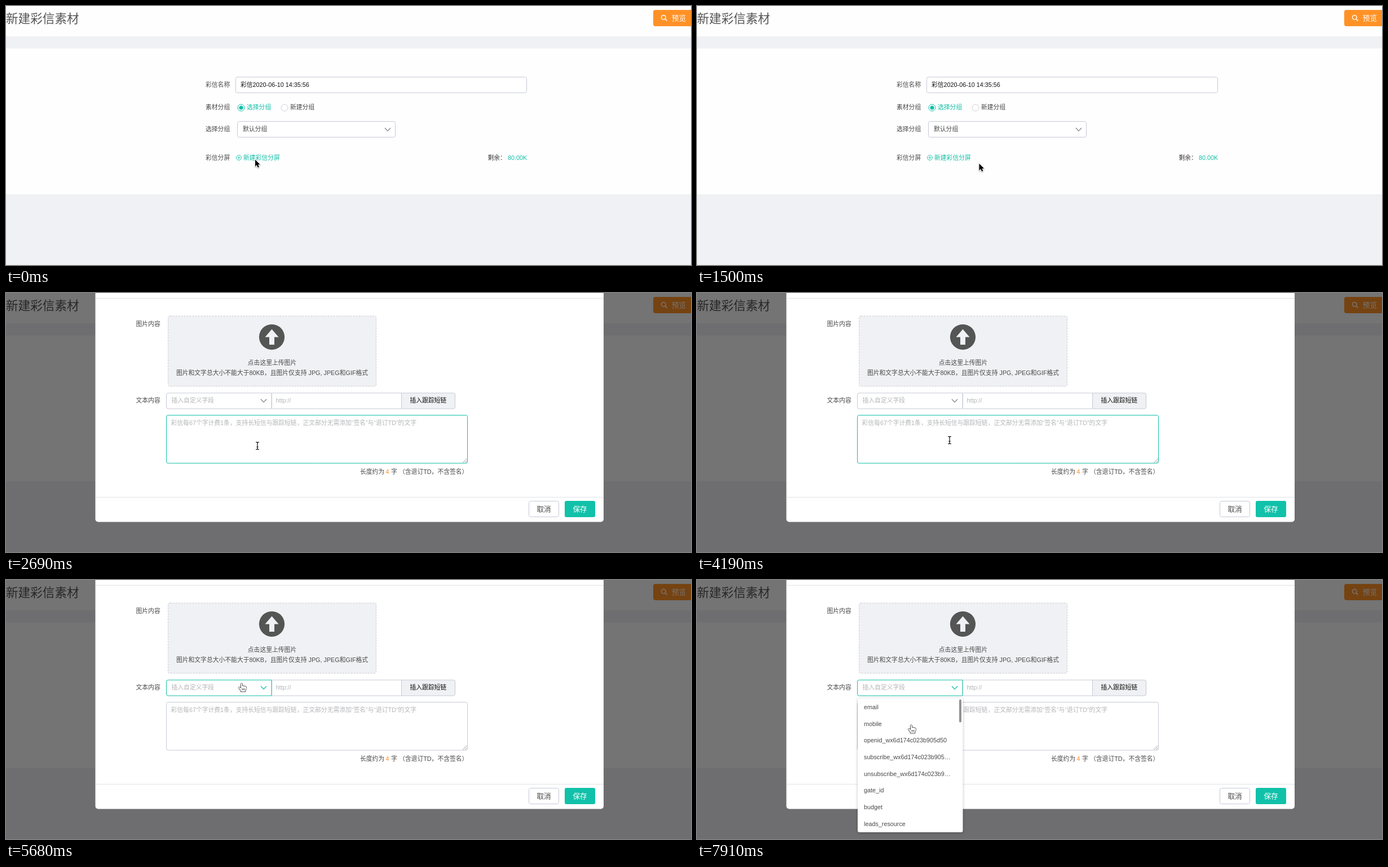
Recreate the animation shown at these times as an HTML page with a canvas. Size 1215 by 461 pixels, loop 8000 ms.

```html
<!DOCTYPE html>
<html lang="zh-CN">
<head>
<meta charset="utf-8">
<style>
html, body { margin: 0; width: 100%; height: 100%; overflow: hidden; background: #fff; }
canvas { display: block; width: 1215px; height: 461px; }
</style>
</head>
<body>
<canvas id="stage" width="1215" height="461"></canvas>
<script>
const ctx = document.getElementById('stage').getContext('2d');
const W = 1215, H = 461, LOOP = 8000;
const FONT = '"Liberation Sans", "Noto Sans CJK SC", "Noto Sans CJK", sans-serif';
const TEAL = '#10bfa6', GREY = '#f0f1f4', BORDER = '#c6cad6', INK = '#484848', HINT = '#b4b5b8';

// Pointer stops: start time, left, top, shape
const STOPS = [
  [0, 440.5, 272.5, 'arrow'], [150, 472, 275, 'arrow'], [300, 590, 278, 'arrow'],
  [450, 745, 280, 'arrow'], [600, 885, 280, 'arrow'], [750, 960, 279, 'arrow'],
  [900, 978, 278, 'arrow'], [1050, 913, 278, 'arrow'], [1200, 770, 279, 'arrow'],
  [1350, 610, 279, 'arrow'], [1500, 499, 279.5, 'arrow'], [1650, 445, 275, 'arrow'],
  [1950, 445, 270.5, 'arrow'], [2400, 440, 270, 'hand'], [2550, 446, 272, 'beam'],
  [4190, 448, 262, 'beam'], [4340, 456, 205, 'arrow'], [4490, 457, 163, 'hand'],
  [4640, 456, 151, 'hand'], [5090, 455, 152, 'hand'], [5240, 449, 157, 'hand'],
  [5390, 438, 169, 'arrow'], [5540, 412, 183, 'hand'], [5690, 398, 193, 'hand'],
  [5830, 392, 197, 'hand'], [7330, 392, 200, 'hand'], [7480, 390, 212, 'hand'],
  [7630, 385, 233, 'hand'], [7780, 378, 250, 'hand'], [7910, 374, 257, 'hand']
];
const FIELDS = ['email', 'mobile', 'openid_wx6d174c023b905d50', 'subscribe_wx6d174c023b905…',
  'unsubscribe_wx6d174c023b9…', 'gate_id', 'budget', 'leads_resource'];

function rect(x, y, w, h, color) {
  ctx.fillStyle = color;
  ctx.fillRect(x, y, w, h);
}

function box(x, y, w, h, r, fill, stroke, dash = []) {
  ctx.beginPath();
  ctx.roundRect(x, y, w, h, r);
  if (fill) { ctx.fillStyle = fill; ctx.fill(); }
  if (stroke) {
    ctx.lineWidth = 1;
    ctx.strokeStyle = stroke;
    ctx.setLineDash(dash);
    ctx.stroke();
    ctx.setLineDash([]);
  }
}

// y is the middle of the line
function text(s, x, y, color = INK, size = 10.8, align = 'left') {
  ctx.font = `${size}px ${FONT}`;
  ctx.textAlign = align;
  ctx.fillStyle = color;
  ctx.fillText(s, x, y + size * 0.37);
}

function line(color, width, ...p) {
  ctx.beginPath();
  ctx.moveTo(p[0], p[1]);
  for (let i = 2; i < p.length; i += 2) ctx.lineTo(p[i], p[i + 1]);
  ctx.strokeStyle = color;
  ctx.lineWidth = width;
  ctx.stroke();
}

function circle(x, y, r, fill, stroke, width = 1) {
  ctx.beginPath();
  ctx.arc(x, y, r, 0, Math.PI * 2);
  if (fill) { ctx.fillStyle = fill; ctx.fill(); }
  if (stroke) { ctx.strokeStyle = stroke; ctx.lineWidth = width; ctx.stroke(); }
}

function chevron(x, y, color) {
  line(color, 1.2, x - 5, y - 2.5, x, y + 2.8, x + 5, y - 2.5);
}

function drawPage(hover) {
  rect(0, 0, W, H, '#fefefe');
  rect(0, 54, W, 21.5, GREY);
  rect(0, 335, W, H - 335, GREY);
  text('新建彩信素材', 0, 22, '#555', 21.6);

  box(1148, 7, 75, 29, 4, '#ff9226');
  circle(1166.3, 20.3, 3.8, null, '#fff', 1.4);
  line('#fff', 1.6, 1169, 23, 1172.5, 26.5);
  text('预览', 1180.8, 21.5, '#fff', 12.6);

  text('彩信名称', 354, 140.5);
  box(407.5, 126.5, 516, 28, 3, '#fff', BORDER);
  text('彩信2020-06-10 14:35:56', 416, 140.5, '#111');

  text('素材分组', 354, 180.5);
  circle(417, 181, 6, '#fff', TEAL);
  circle(417, 181, 3.6, TEAL);
  text('选择分组', 427, 180.5, TEAL);
  circle(494, 181, 6, '#fff', '#cdd0d8');
  text('新建分组', 504, 180.5);

  text('选择分组', 354, 219.5);
  box(410.5, 205.5, 280, 28, 3, '#fff', BORDER);
  text('默认分组', 420, 219.5);
  chevron(677, 219.5, '#7d828c');

  const link = hover ? '#0d9f8a' : TEAL;
  text('彩信分屏', 354, 270);
  circle(413, 270, 4.4, null, link, 0.9);
  line(link, 0.9, 410.5, 270, 415.5, 270);
  line(link, 0.9, 413, 267.5, 413, 272.5);
  text('新建彩信分屏', 421, 270, link);
  if (hover) line(link, 1, 408, 275.5, 486, 275.5);
  text('剩余：', 854.5, 270, '#333');
  text('80.00K', 890, 270, TEAL);
}

function drawUpload(glow) {
  const mix = (a, b) => Math.round(a + (b - a) * glow);
  const fill = `rgb(${mix(240, 229)},${mix(241, 254)},${mix(244, 248)})`;
  box(287.5, 41, 369, 125, 3, fill, glow ? TEAL : '#c9cacf', glow ? [] : [3, 2]);
  circle(471.5, 78.3, 22.6, '#555');
  ctx.beginPath();
  ctx.moveTo(471.5, 64.5);
  ctx.lineTo(483.5, 78.5);
  ctx.lineTo(476, 78.5);
  ctx.lineTo(476, 92);
  ctx.lineTo(467, 92);
  ctx.lineTo(467, 78.5);
  ctx.lineTo(459.5, 78.5);
  ctx.fillStyle = fill;
  ctx.fill();
  text('点击这里上传图片', 472, 124.5, INK, 10.8, 'center');
  text('图片和文字总大小不能大于80KB，且图片仅支持 JPG, JPEG和GIF格式', 472, 142.5, INK, 10.8, 'center');
}

function drawModal(t) {
  rect(0, 0, W, H, 'rgba(0,0,0,.54)');
  box(158.5, -10, 901.5, 417.5, 5, '#fff');
  rect(158.5, 9, 901.5, 1, '#e1e2e6');
  rect(158.5, 363, 901.5, 1, '#e1e2e6');

  text('图片内容', 230.5, 55);
  const glow = t < 4490 ? 0 : t < 4640 ? 0.6 : t < 5390 ? 1 : 0;
  drawUpload(glow);

  text('文本内容', 230.5, 191.5);
  const active = t >= 5540;
  box(471.5, 178, 230, 28, 0, '#fff', BORDER);
  text('http://', 478.5, 191.5, HINT);
  box(701.5, 178, 95, 28, [0, 3, 3, 0], GREY, BORDER);
  text('插入跟踪短链', 716.5, 191.5, '#111');
  box(284.5, 178, 186.5, 28, [3, 0, 0, 3], '#fff', active ? TEAL : BORDER);
  text('插入自定义字段', 293.5, 191.5, HINT);
  chevron(457, 191.5, active ? TEAL : '#7d828c');

  box(284.5, 217.5, 534, 85.5, 3, '#fff', t < 4340 ? TEAL : BORDER);
  text('彩信每67个字计费1条，支持长短信与跟踪短链，正文部分无需添加“签名”与“退订TD”的文字', 292.5, 231, HINT);
  line('#777', 0.8, 810.5, 302, 817.5, 295);
  line('#777', 0.8, 814.5, 302, 817.5, 299);

  text('长度约为', 628, 318);
  text('4', 673.5, 318, '#ff8a1f');
  text('字', 683, 318);
  text('（含退订TD，不含签名）', 697, 318);

  box(927.5, 370.5, 53, 28, 3, '#fff', BORDER);
  text('取消', 954, 384.5, INK, 12.6, 'center');
  box(991, 370, 54, 29, 3, '#11c1a9');
  text('保存', 1018, 384.5, '#fff', 12.6, 'center');

  if (t >= 6430) drawMenu(t < 6580 ? 0 : 1);
}

function drawMenu(dy) {
  ctx.save();
  ctx.shadowColor = 'rgba(0,0,0,.25)';
  ctx.shadowBlur = 5;
  ctx.shadowOffsetY = 1;
  box(285, 209.5 + dy, 186.5, 238.5, 3, '#fff');
  ctx.restore();
  FIELDS.forEach((name, i) => text(name, 296, 225 + dy + i * 29.7));
  box(465, 211.5 + dy, 4, 41, 2, '#929292');
}

const arrow = new Path2D('M1.5 1 V13.2 L4.3 10.6 L6.2 15 L8.4 14 L6.5 9.8 H10.2 Z');
const hand = new Path2D('M5 10 L3.2 8 C2 6.9 .4 7.8 1.2 9.2 L4.6 14 V15.5 H12.5 V13.8 ' +
  'C13.7 12 14 10.5 14 7.6 C14 6 12.2 5.9 11.8 7 C11.7 5.3 9.9 5.2 9.4 6.4 ' +
  'C9.2 5 7.4 4.8 7 6 V2.2 C7 .5 4.8 .5 4.8 2.2 Z');

function drawPointer([, x, y, kind]) {
  ctx.save();
  ctx.translate(x, y);
  ctx.lineJoin = 'round';
  if (kind === 'beam') {
    for (const [color, width] of [['rgba(255,255,255,.8)', 2.6], ['#111', 1.2]]) {
      line(color, width, -3, -6.5, -1, -6.5, 0, -5.5, 1, -6.5, 3, -6.5);
      line(color, width, -3, 6.5, -1, 6.5, 0, 5.5, 1, 6.5, 3, 6.5);
      line(color, width, 0, -5.5, 0, 5.5);
      line(color, width, -1.6, 2, 1.6, 2);
    }
  } else {
    const isArrow = kind === 'arrow', shape = isArrow ? arrow : hand;
    ctx.lineWidth = isArrow ? 1.8 : 1.1;
    ctx.strokeStyle = isArrow ? '#fff' : '#000';
    ctx.fillStyle = isArrow ? '#000' : '#fff';
    ctx.shadowColor = 'rgba(0,0,0,.35)';
    ctx.shadowBlur = 2;
    ctx.shadowOffsetY = 1;
    ctx.stroke(shape);
    ctx.shadowColor = 'transparent';
    ctx.fill(shape);
    if (!isArrow) for (const fx of [7, 9, 11]) line('#000', 0.7, fx, 10, fx, 13);
  }
  ctx.restore();
}

function draw(t) {
  drawPage(t >= 2400 && t < 2690);
  if (t >= 2690) drawModal(t);
  drawPointer(STOPS.findLast(stop => stop[0] <= t));
}

const start = performance.now();
function tick() {
  draw((performance.now() - start) % LOOP);
  requestAnimationFrame(tick);
}
tick();
</script>
</body>
</html>
```
